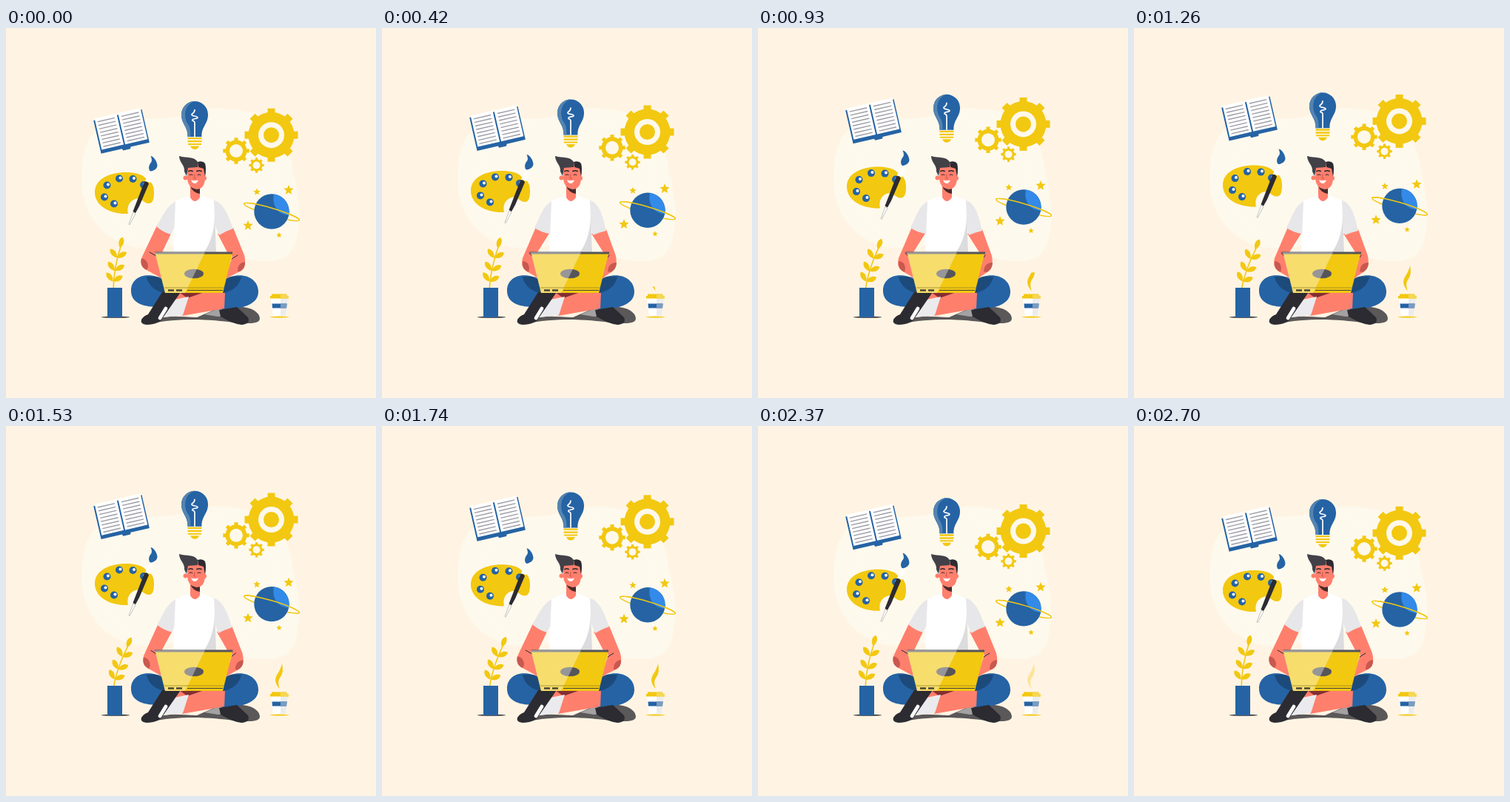
An HTML page for the animation above (2760 ms loop, 500 by 500 pixels).

```html
<!DOCTYPE html>
<html lang="en">
<head>
<meta charset="utf-8">
<style>
html, body { margin: 0; width: 100%; height: 100%; overflow: hidden; background: #fff4e3; }
svg { display: block; width: 500px; height: 500px; }
.y { fill: #f2c811; }
.b { fill: #2563a4; }
.k { fill: #2c2b31; }
.w { fill: #fff; }
.skin { fill: #ff7f6d; }
.shade { fill: #c9584f; }
.sleeve { fill: #e7e7e9; }
.line { fill: none; stroke: #2c2b31; stroke-width: 1; stroke-linecap: round; }
.ring { fill: none; stroke: #f2c811; stroke-width: 1.5; }
</style>
</head>
<body>
<svg viewBox="0 0 500 500">
  <path fill="#fef9ed" d="M102 205C102 165 112 130 150 124C180 120 215 127 240 117C270 105 310 107 340 117C372 128 383 160 388 195C394 220 399 245 395 270C391 302 382 315 350 315C320 316 290 298 250 294C215 292 185 305 155 290C125 278 102 245 102 205Z"/>
  <ellipse cx="248" cy="212" rx="119" ry="92" fill="none" stroke="#fffdf7" stroke-dasharray="3 3"/>

  <g id="book"><g transform="translate(118 124) rotate(-13)">
    <path class="b" d="M0 1H67V47H41L40 49.500H30L29 47H0Z"/>
    <path class="w" d="M2-1H32.500V42H2ZM34.500-1H65.500V42H34.500Z"/>
    <path id="rules" stroke="#9c9ca5" stroke-width="1.400"/>
  </g></g>

  <g id="bulb">
    <path class="b" d="M245.500 147C246 133 237 130 237 117A18 18 0 0 1 273 117C273 130 264 133 264.500 147Z"/>
    <path fill="#5484b0" d="M245.500 147C246 133 237 130 237 117A18 18 0 0 1 255 99C240 103 240 122 246 130Q250 136 249.500 147Z"/>
    <path fill="none" stroke="#fff" stroke-width="1.700" d="M255 147V128C255 125 251 126 252 124C253 122 259 123 259 121C258 118 251 120 251 117C251 115 255 116 255 110"/>
    <path class="y" d="M245.500 148H264.500V150.300H245.500ZM245.500 152H264.500V154.300H245.500ZM246 156H264V158H246ZM249 159.500H261Q259 164 255 164T249 159.500Z"/>
  </g>

  <g id="gears" class="y"></g>

  <g id="palette">
    <path class="y" d="M165 251C140 252 120 240 120 222C120 204 140 195 162 195C172 195 186 197 190 205C197 207 200 213 200 222C200 232 198 238 192 237C185 236 182 228 175 231C166 234 163 242 165 251Z"/>
    <g id="paints"></g>
    <path class="b" d="M195.500 173C200 174 204 180 204.500 186C204 191 199 193 195 194C192 190 193 186 195 183C198 180 197 177 195.500 173Z"/>
    <path fill="#fffdf6" d="M194 193L200 195L195 209L188 207Z"/>
    <path class="k" d="M187 208Q191 206 193 210.500L180 241L175 250L171.500 248Z"/>
    <path class="w" stroke="#9b9b9b" stroke-width=".6" d="M172 249L175 251L167 266L166 265Z"/>
  </g>

  <g id="planet">
    <ellipse class="ring" cx="359" cy="248.500" rx="39" ry="5" transform="rotate(16.500 359 248.500)"/>
    <circle class="b" cx="359" cy="248" r="23.700"/>
    <path fill="#338ae8" d="M362 224.500A23.700 23.700 0 0 1 382 253C367 252 359 240 362 224.500Z"/>
    <path class="ring" transform="rotate(16.500 359 248.500)" d="M320 248.500A39 5 0 0 1 398 248.500"/>
    <g id="stars" class="y"></g>
  </g>

  <g id="plant" class="y"></g>
  <ellipse class="k" cx="148" cy="390.800" rx="19" ry="1"/>
  <path class="b" d="M137 351H157V391H137Z"/>

  <clipPath id="reveal"><rect id="revealBox" x="350" width="40" height="40"/></clipPath>
  <path id="steam" class="y" clip-path="url(#reveal)" d="M373 321C371 332 364 336 364 344Q365 351 370 355C367 347 368 343 371 339C375 333 374 327 373 321Z"/>
  <ellipse class="y" cx="369.500" cy="390.600" rx="13" ry="1"/>
  <path class="w" d="M358 365H381L378 389H361Z"/>
  <path fill="#ececec" d="M371 365H381L378 389H371Z"/>
  <path class="b" d="M359.500 372.500H379.500L379 378.500H360Z"/>
  <path fill="#7b9bbd" d="M371 372.500H379.500L379 378.500H371Z"/>
  <path class="y" d="M359 359.500H379L380 362H382V365.500H357V362H359Z"/>
  <path fill="#f5d756" d="M371 359.500H379L380 362H382V365.500H371Z"/>

  <path fill="#5b5859" d="M190 400C215 385 235 391 258 391L290 377H320C336 379 343 386 343 393C342 401 325 399 308 398C280 395 245 390 190 400Z"/>
  <path fill="#a3a1a2" d="M268 387L290 378L299 389L286 390Z"/>
  <path class="b" d="M216 342C196 328 169 333 169 355C169 374 190 379 218 376ZM292 342C316 326 341 337 341 356C341 375 318 379 292 381Z"/>
  <path opacity=".25" d="M190 336C192 348 203 357 216 358V336ZM318 336C316 348 305 357 292 358V336Z"/>
  <path class="skin" d="M214 358H296L295 379L238 389Z"/>
  <path fill="#842f32" d="M234 357H268L245 365Z"/>
  <path fill="#ebebed" d="M228 367L247 363L239 388L212 391Z"/>
  <path class="k" d="M211 357H236L211 393Q207 400 190 401Q181 400 183 394Q186 389 192 387ZM288 381L312 377L327 391Q331 400 318 401Q307 400 290 390Z"/>
  <path stroke="#fff" stroke-width="4.800" stroke-linecap="round" d="M216 379L208 392"/>

  <path class="skin" data-a="M204 267L184 309Q180 321 188 326L212 339L203 307L211 303L224 276Z" data-b="M208 269L190 311Q187 322 194 328L213 339L203 307L210 303L227 276Z"/>
  <path class="skin" data-a="M307 270L322 307Q326 323 316 329L296 339L306 309L299 303L286 278Z" data-b="M303 272L316 308Q319 324 310 330L296 339L305 309L299 303L283 278Z"/>
  <path class="shade" data-a="M183 311Q192 313 192 323L190 327Q180 322 183 311Z" data-b="M190 315Q199 316 199 325L198 330Q188 325 190 315Z"/>
  <path class="shade" data-a="M323 316Q313 317 313 329L316 329Q324 325 323 316Z" data-b="M317 317Q306 317 305 329L309 330Q317 326 317 317Z"/>
  <path class="line" data-a="M194 303L203 308M313 307L305 312" data-b="M199 304L203 308M307 307L305 310"/>

  <path class="sleeve" data-a="M232 233C217 239 212 255 203 268Q212 276 223 279L232 260Z" data-b="M232 233C217 239 214 255 206 270Q215 276 226 278L232 260Z"/>
  <path class="sleeve" data-a="M279 232C295 236 300 253 307 271Q298 274 288 280L280 260Z" data-b="M279 232C294 236 298 253 303 274Q294 276 285 280L280 260Z"/>
  <path class="w" d="M229 234L248 226H263L281 233L284 304H226Z"/>
  <path fill="#dcdcde" d="M282 252C282 272 277 290 267 304H284Z"/>

  <path class="skin" d="M249 208H262V229Q255 239 249 229Z"/>
  <path fill="#472a2b" d="M249 214Q256 219 262 214V224Q253 223 249 214Z"/>
  <path class="skin" d="M245 184H269V204Q268 218 257 218Q246 216 245 204Z"/>
  <circle class="skin" cx="242.500" cy="202.500" r="3"/>
  <circle class="skin" cx="268" cy="203" r="3"/>
  <path class="k" d="M259 181Q266 179 269 183Q271 190 269 201L267 190L260 188Z"/>
  <path fill="#424147" d="M234 173C244 176 254 173 259 181V188L246 189L244 200L241 194C242 185 234 182 234 173Z"/>
  <path class="line" stroke-linejoin="round" style="stroke-width:1.7" d="M247 193.500Q250 192 252 193.500M258 193.500Q261 192 264 193.500"/>
  <path class="line" d="M248 198.500Q250 197 252 198.500M259 198.500Q261 197 263 198.500"/>
  <path stroke="#d4534b" fill="none" d="M255 197L254 203H257"/>
  <path class="w" d="M250 205.500Q255 207 260 205.500Q258 210 255 210T250 205.500Z"/>

  <path class="y" d="M202 305H306L293 358H215Z"/>
  <path fill="#55555a" data-a="M201 302.500H306V305.500H202Z" data-b="M199 302.500H307V305.500H202Z"/>
  <ellipse cx="254" cy="332" rx="13" ry="6.300" fill="#55555a"/>
  <path fill="#fff" opacity=".38" d="M201 303H269L242 358H215Z"/>
  <path stroke="#8c7c22" stroke-width=".7" d="M214 351H295"/>
  <path stroke="#4a4536" stroke-width="2.300" d="M219 354.500H227M230 354.500H238"/>
  <path stroke="#4a4536" d="M245 354.500H293"/>
</svg>
<script>
const $ = id => document.getElementById(id);
const range = n => [...Array(n).keys()];
const clamp = x => Math.max(0, Math.min(1, x));
const smooth = x => (x = clamp(x), x * x * (3 - 2 * x));

$('rules').setAttribute('d', range(8).map(i => `M5 ${4 + i * 4.9}h24M38 ${4 + i * 4.9}h24`).join(''));

function gear(x, y, body, outer, tooth, hole, hub) {
  const teeth = range(4).map(i =>
    `<rect x="${-outer}" y="${-tooth / 2}" width="${outer * 2}" height="${tooth}" transform="rotate(${i * 45})"/>`);
  return `<g transform="translate(${x} ${y})">${teeth.join('')}<circle r="${body}"/>
    <circle r="${hole}" fill="#fef8ea"/><circle r="${hub}"/></g>`;
}
$('gears').innerHTML = gear(358.5, 144.7, 31, 36, 10, 17.5, 10.5) +
  gear(311, 166, 14.5, 17.7, 5, 9, 0) + gear(338.5, 185.5, 8, 10.2, 3.2, 5, 0);

$('paints').innerHTML = [[136.5, 212.5], [153, 203.5], [171.5, 204], [133, 228.5], [146, 237.5], [186, 212]]
  .map(([x, y]) => `<circle class="b" cx="${x}" cy="${y}" r="5"/><circle class="w" cx="${x + 1.5}" cy="${y - 1}" r="2"/>`).join('');

function star(x, y, r) {
  const points = range(10).map(i => {
    const a = i * Math.PI / 5, d = i % 2 ? r * .45 : r;
    return [x + d * Math.sin(a), y - d * Math.cos(a)];
  });
  return `<polygon points="${points.join(' ')}"/>`;
}
$('stars').innerHTML = star(382, 219, 7) + star(339, 221.5, 5) + star(327, 267, 7) + star(369, 280, 4);

const leaf = (x, y, angle) =>
  `<path transform="translate(${x} ${y}) rotate(${angle})" d="M0 0C-5 -6 -4 -12 0 -15C4 -12 5 -6 0 0Z"/>`;
$('plant').innerHTML = '<path d="M145 356Q145 325 156 292" fill="none" stroke="#f2c811" stroke-width="1.6"/>' +
  leaf(154, 297, 13) +
  [[150, 310.5], [147, 328], [144.7, 342.5]].map(([x, y]) => leaf(x, y, -37) + leaf(x, y, 60)).join('');

const morphs = [...document.querySelectorAll('[data-a]')].map(node => {
  const to = node.dataset.b.match(/[\d.]+/g);
  return k => {
    let i = 0;
    node.setAttribute('d', node.dataset.a.replace(/[\d.]+/g, n => +n + (to[i++] - n) * k));
  };
});

const lifts = { book: 17.5, bulb: 11.8, gears: 19, palette: 9.5, planet: 7.7 };

function draw(now) {
  const t = Math.min(2700, Math.floor(now % 2760 / 30) * 30);
  const wave = (1 - Math.cos(t / 2700 * 2 * Math.PI)) / 2;
  for (const id in lifts) $(id).setAttribute('transform', `translate(0 ${-lifts[id] * wave})`);
  $('plant').setAttribute('transform', `rotate(${10 * wave} 145 354)`);
  const reach = smooth(t / 420) - smooth((t - 1290) / 420);
  morphs.forEach(morph => morph(reach));
  $('revealBox').setAttribute('y', 355 - 34 * clamp((t - 270) / 910));
  $('steam').setAttribute('opacity', 1 - clamp((t - 1740) / 960));
  requestAnimationFrame(() => draw(performance.now()));
}
draw(0);
</script>
</body>
</html>
```
